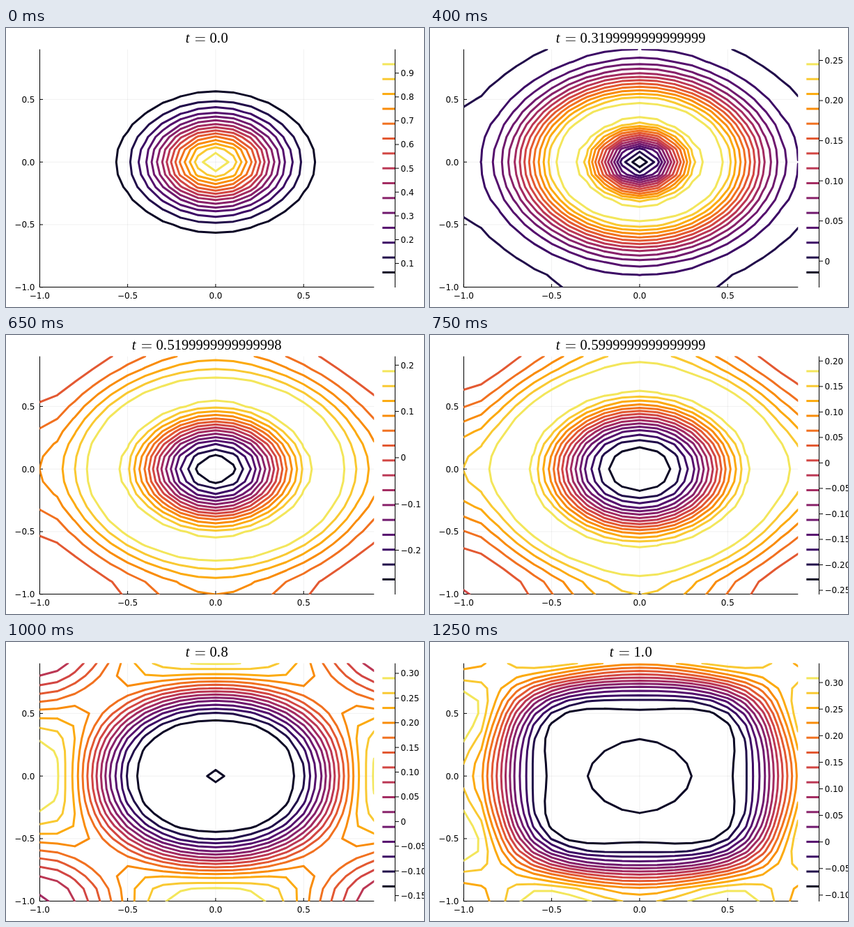
An HTML page with a canvas for the animation above (1300 ms loop, 600 by 400 pixels).

```html
<!DOCTYPE html>
<html lang="en">
<head>
<meta charset="utf-8">
<title>Wave equation contours</title>
<style>
  html, body { margin: 0; width: 100%; height: 100%; overflow: hidden; background: #fff; }
  canvas { display: block; width: 600px; height: 400px; }
</style>
</head>
<body>
<canvas id="stage" width="600" height="400"></canvas>
<script>
const ctx = document.getElementById('stage').getContext('2d');

const FRAMES = 26, FRAME_MS = 50;
const N = 20, LEVELS = 15;
const LEFT = 48.3, RIGHT = 528.3, TOP = 30.6, BOTTOM = 371.7;
const BAR_X = 558.5;
const STEP_X = (RIGHT - LEFT) / (N - 1), STEP_Y = (BOTTOM - TOP) / (N - 1);
const LABEL_FONT = '12px "DejaVu Sans", sans-serif';
const EM = 20.5;

// Inferno at the inner sixteenths
const COLORS = [
  '#0c0826', '#210c4a', '#3c0965', '#56106e', '#70196e', '#89226a', '#a32b61', '#bb3754',
  '#d24643', '#e35932', '#f17120', '#f98c0a', '#fcaa0f', '#f9c932', '#f3e65b'
];

// Periodic 2D wave equation on [-1, 1), integrated with the Verlet scheme
function simulate() {
  const at = (u, i, j) => u[(j + N) % N * N + (i + N) % N];
  const dt = 0.4 * (1 - 0.9);
  const courant2 = 0.16;
  let now = Float64Array.from({ length: N * N }, (_, k) => {
    const x = k % N / 10 - 1, y = Math.floor(k / N) / 10 - 1;
    return Math.exp(-9 * (x * x + y * y));
  });
  let before = null, t = 0;
  const states = [];
  for (let n = 0; n < FRAMES; n++) {
    states.push({ u: now, t: n === FRAMES - 1 ? 1 : t, min: Math.min(...now), max: Math.max(...now) });
    const next = now.map((v, k) => {
      const i = k % N, j = Math.floor(k / N);
      const lap = at(now, i - 1, j) + at(now, i + 1, j) + at(now, i, j - 1) + at(now, i, j + 1) - 4 * v;
      return before ? 2 * v - before[k] + courant2 * lap : v + courant2 * lap / 2;
    });
    before = now;
    now = next;
    t += dt;
  }
  return states;
}

const plotX = x => LEFT + (x + 1) * 10 * STEP_X;
const plotY = y => BOTTOM - (y + 1) * 10 * STEP_Y;

function line(x1, y1, x2, y2) {
  ctx.beginPath();
  ctx.moveTo(x1, y1);
  ctx.lineTo(x2, y2);
  ctx.stroke();
}

function label(text, x, y, align) {
  ctx.textAlign = align;
  ctx.fillText(text, x, y + 4.4);
}

function number(v, digits) {
  return v.toFixed(digits).replace('-', '\u2212');
}

function drawAxes() {
  const ticks = [-1, -0.5, 0, 0.5];
  ctx.lineWidth = 1;
  ctx.strokeStyle = 'rgba(0,0,0,0.06)';
  for (const v of ticks) {
    line(plotX(v), TOP, plotX(v), BOTTOM);
    line(LEFT, plotY(v), RIGHT, plotY(v));
  }
  ctx.strokeStyle = ctx.fillStyle = '#000';
  ctx.font = LABEL_FONT;
  line(48.5, TOP, 48.5, 372);
  line(48, 371.5, RIGHT, 371.5);
  for (const v of ticks) {
    line(plotX(v), 371.5, plotX(v), 367);
    line(48.5, plotY(v), 53, plotY(v));
    label(number(v, 1), plotX(v), 383.3, 'center');
    label(number(v, 1), 41.5, plotY(v), 'right');
  }
}

// Marching squares for one level
function traceLevel(u, level) {
  const cross = (i1, j1, a, i2, j2, b) => {
    if ((a < level) === (b < level)) return null;
    const f = (level - a) / (b - a);
    return [LEFT + (i1 + f * (i2 - i1)) * STEP_X, BOTTOM - (j1 + f * (j2 - j1)) * STEP_Y];
  };
  const segment = (p, q) => {
    ctx.moveTo(...p);
    ctx.lineTo(...q);
  };
  for (let j = 0; j < N - 1; j++) {
    for (let i = 0; i < N - 1; i++) {
      const k = j * N + i;
      const a = u[k], b = u[k + 1], c = u[k + N + 1], d = u[k + N];
      const sides = [
        cross(i, j, a, i + 1, j, b),
        cross(i + 1, j, b, i + 1, j + 1, c),
        cross(i, j + 1, d, i + 1, j + 1, c),
        cross(i, j, a, i, j + 1, d)
      ];
      const hits = sides.filter(Boolean);
      if (hits.length === 2) {
        segment(hits[0], hits[1]);
      } else if (hits.length === 4) {
        const joined = ((a + b + c + d) / 4 < level) === (a < level);
        segment(sides[0], sides[joined ? 1 : 3]);
        segment(sides[2], sides[joined ? 3 : 1]);
      }
    }
  }
}

function drawContours({ u, min, max }) {
  ctx.save();
  ctx.beginPath();
  ctx.rect(LEFT, TOP - 0.3, RIGHT - LEFT, BOTTOM - TOP + 0.3);
  ctx.clip();
  ctx.lineWidth = 3;
  ctx.lineCap = 'round';
  COLORS.forEach((color, n) => {
    ctx.strokeStyle = color;
    ctx.beginPath();
    traceLevel(u, min + (max - min) * (n + 1) / (LEVELS + 1));
    ctx.stroke();
  });
  ctx.restore();
}

function tickStep(range) {
  const power = Math.floor(Math.log10(range));
  const factor = range / 10 ** power;
  const unit = factor > 5 ? 2 : factor > 2.5 ? 1 : factor > 1 ? 0.5 : 0.2;
  return unit * 10 ** power / 2;
}

function drawColorbar({ min, max }) {
  const height = BOTTOM - TOP;
  ctx.lineWidth = 3;
  COLORS.forEach((color, n) => {
    const y = BOTTOM - height * (n + 1) / (LEVELS + 1);
    ctx.strokeStyle = color;
    line(540.3, y, 558.3, y);
  });
  ctx.lineWidth = 1;
  ctx.strokeStyle = ctx.fillStyle = '#000';
  ctx.font = LABEL_FONT;
  line(BAR_X, TOP, BAR_X, 372);
  const step = tickStep(max - min);
  const digits = step > 0.09 ? 1 : step > 0.04 ? 2 : 3;
  for (let n = Math.ceil(min / step); n * step < max - 1e-9; n++) {
    const y = BOTTOM - height * (n * step - min) / (max - min);
    line(BAR_X, y, 564, y);
    label(n === 0 ? '0' : number(n * step, digits), 566.5, y, 'left');
  }
}

function drawTitle(t) {
  const value = Number.isInteger(t) ? t.toFixed(1) : String(t);
  const advance = ch => (ch === '.' ? 0.278 : 0.5) * EM;
  const prefix = 1.695 * EM, baseline = 21;
  const width = [...value].reduce((sum, ch) => sum + advance(ch), prefix);
  let x = 288.2 - width / 2;
  ctx.fillStyle = '#000';
  ctx.textAlign = 'left';
  ctx.font = `italic ${EM}px "Liberation Serif", serif`;
  ctx.fillText('t', x, baseline);
  for (const rise of [0.133, 0.367]) {
    ctx.fillRect(x + 0.695 * EM, baseline - rise * EM - 0.4, 0.666 * EM, 0.8);
  }
  ctx.font = `${EM}px "Liberation Serif", serif`;
  x += prefix;
  for (const ch of value) {
    ctx.fillText(ch, x, baseline);
    x += advance(ch);
  }
}

const states = simulate();
const start = performance.now();

function render() {
  const elapsed = Math.max(0, performance.now() - start);
  const state = states[Math.floor(elapsed / FRAME_MS) % FRAMES];
  ctx.fillStyle = '#fff';
  ctx.fillRect(0, 0, 600, 400);
  drawAxes();
  drawContours(state);
  drawColorbar(state);
  drawTitle(state.t);
  requestAnimationFrame(render);
}
render();
</script>
</body>
</html>
```
